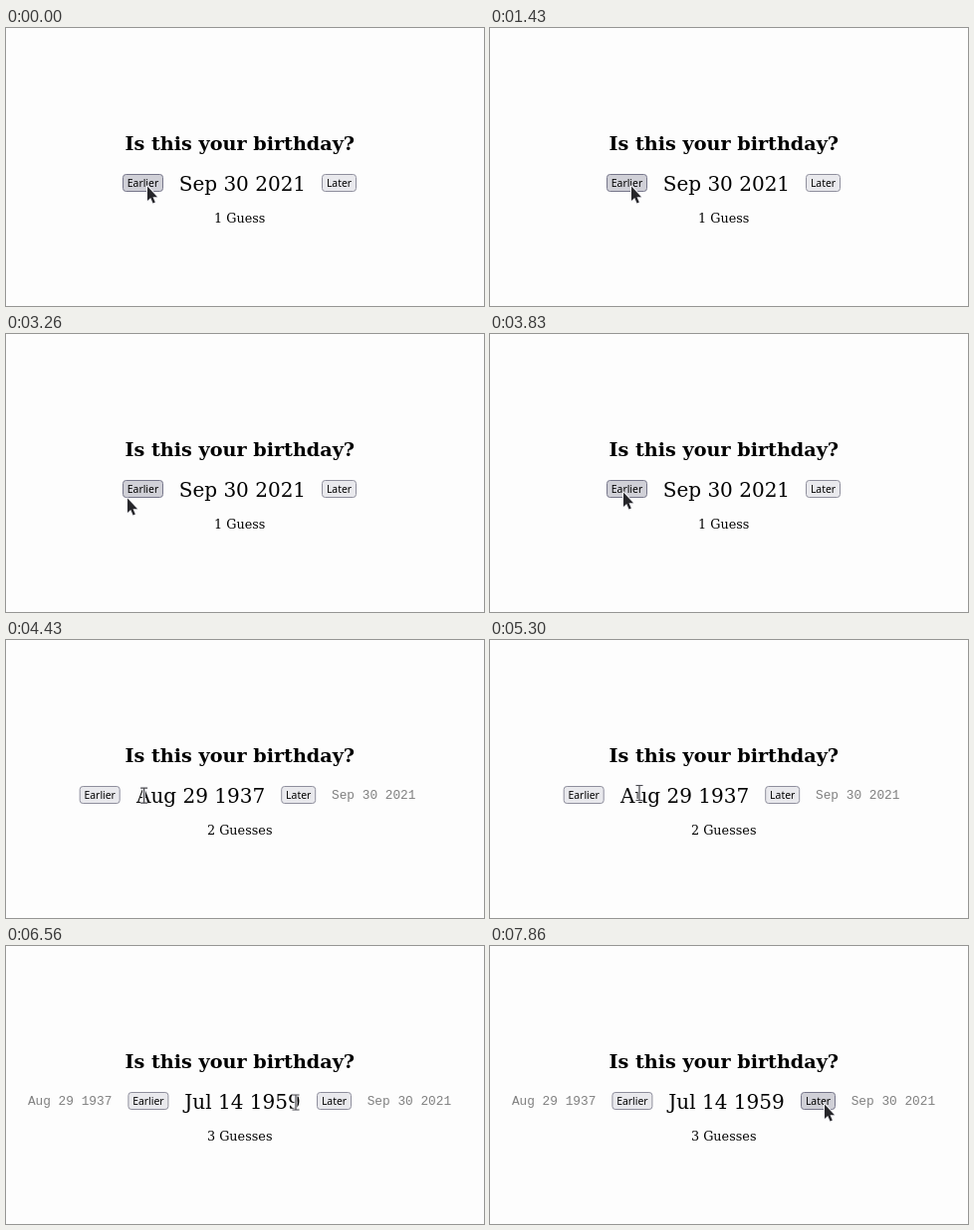
These frames come from a looping animation (480 by 280 pixels, 7.99 s). An HTML page:

```html
<!DOCTYPE html>
<html lang="en">
<head>
<meta charset="utf-8">
<title>Birthday guess</title>
<style>
  html, body { margin: 0; width: 100%; height: 100%; overflow: hidden; background: #fdfdfd; }
  svg { display: block; width: 480px; height: 280px; }
  text { fill: #000; font-family: "DejaVu Serif", serif; }
  .title { font-size: 19.2px; font-weight: bold; text-anchor: middle; }
  .date { font-size: 20px; }
  .count { font-size: 12.8px; text-anchor: middle; }
  .bound { font: 12.8px "Liberation Mono", monospace; fill: #808080; }
  .button text { font: 10.4px "Noto Sans", "Open Sans", sans-serif; text-anchor: middle; }
  .button rect { fill: #e9e9ed; stroke: #8f8f9d; }
  .button.hover rect { fill: #d0d0d7; stroke: #76768a; }
  .arrow { fill: #26262a; stroke: #f4f4f8; stroke-width: 2; paint-order: stroke; stroke-linejoin: round; }
  .beam path { fill: none; stroke: #4a4a4e; stroke-width: 1.2; }
  .beam path:first-child { stroke: #f4f4f8; stroke-width: 3; }
</style>
</head>
<body>
<svg viewBox="0 0 480 280">
  <text class="title" x="234.8" y="123">Is this your birthday?</text>
  <text class="bound" id="low" y="160"></text>
  <g class="button" id="earlier">
    <rect x=".5" y="147.5" width="40" height="17" rx="3"/>
    <text x="20.5" y="160">Earlier</text>
  </g>
  <text class="date" id="date" y="164"></text>
  <g class="button" id="later">
    <rect x=".5" y="147.5" width="34" height="17" rx="3"/>
    <text x="17.5" y="160">Later</text>
  </g>
  <text class="bound" id="high" y="160"></text>
  <text class="count" id="count" y="196"></text>
  <g id="pointer">
    <path class="arrow" d="M1 1.5V16L4.2 13L6.6 18.6L8.8 17.6L6.5 12.2H11Z"/>
    <g class="beam">
      <path d="M-3.5 -7.5H3.5M0 -7.5V7.5M-3.5 7.5H3.5"/>
      <path d="M-3.5 -7.5H3.5M0 -7.5V7.5M-3.5 7.5H3.5"/>
    </g>
  </g>
</svg>
<script>
const LOOP = 7990;
const $ = id => document.getElementById(id);
const arrow = document.querySelector('.arrow');
const beam = document.querySelector('.beam');

// Each guess starts at a click; x positions are left edges.
const guesses = [
  { at: 0, date: 'Sep 30 2021', count: '1 Guess', earlier: 117, dateX: 173.7, later: 317 },
  { at: 4060, date: 'Aug 29 1937', count: '2 Guesses', earlier: 73.7, dateX: 131, later: 276.2,
    high: 'Sep 30 2021', highX: 327 },
  { at: 6460, date: 'Jul 14 1959', count: '3 Guesses', earlier: 122.4, dateX: 179.3, later: 312,
    low: 'Aug 29 1937', lowX: 21.9, high: 'Sep 30 2021', highX: 362.7 }
];

// Pointer stops: time, x, y
const stops = [
  [0, 141, 158], [2430, 141, 158], [2760, 71, 199], [2880, 18, 216],
  [3230, 119, 165], [3600, 133, 158], [4200, 133, 158], [4800, 150, 154],
  [5300, 150, 154], [6060, 289, 158], [6160, 291, 157.5], [6750, 291, 157.5],
  [7230, 329, 159], [7400, 329, 159], [7700, 335, 158], [LOOP, 335, 158]
];

// Smooth path through the stops, at rest wherever a stop repeats or turns.
function slope(i, axis) {
  const a = stops[i - 1], b = stops[i], c = stops[i + 1];
  if (!a || !c) return 0;
  const before = (b[axis] - a[axis]) / (b[0] - a[0]);
  const after = (c[axis] - b[axis]) / (c[0] - b[0]);
  return before * after > 0 ? 2 * before * after / (before + after) : 0;
}

function along(t, axis) {
  let i = 0;
  while (i < stops.length - 2 && t >= stops[i + 1][0]) i++;
  const a = stops[i], b = stops[i + 1], span = b[0] - a[0];
  const u = (t - a[0]) / span, v = 1 - u;
  return v * v * (1 + 2 * u) * a[axis] + u * u * (3 - 2 * u) * b[axis]
    + span * u * v * (v * slope(i, axis) - u * slope(i + 1, axis));
}

function label(id, text = '', x = 0) {
  const el = $(id);
  if (el.textContent !== text) el.textContent = text;
  el.setAttribute('x', x);
}

function button(id, x, width, px, py) {
  const over = px >= x && px <= x + width && py >= 147 && py <= 165;
  $(id).setAttribute('transform', `translate(${x} 0)`);
  $(id).classList.toggle('hover', over);
}

function draw(t) {
  const g = guesses.filter(s => t >= s.at).pop();
  const x = along(t, 1), y = along(t, 2);
  label('low', g.low, g.lowX);
  label('date', g.date, g.dateX);
  label('high', g.high, g.highX);
  label('count', g.count, 234.7);
  button('earlier', g.earlier, 41, x, y);
  button('later', g.later, 35, x, y);

  const onDate = x >= g.dateX && x <= g.later - 16 && y > 144 && y < 168;
  arrow.style.display = onDate ? 'none' : '';
  beam.style.display = onDate ? '' : 'none';
  $('pointer').setAttribute('transform', `translate(${x.toFixed(2)} ${y.toFixed(2)})`);
}

const start = performance.now();
function tick() {
  draw((performance.now() - start) % LOOP);
  requestAnimationFrame(tick);
}
tick();
</script>
</body>
</html>
```
